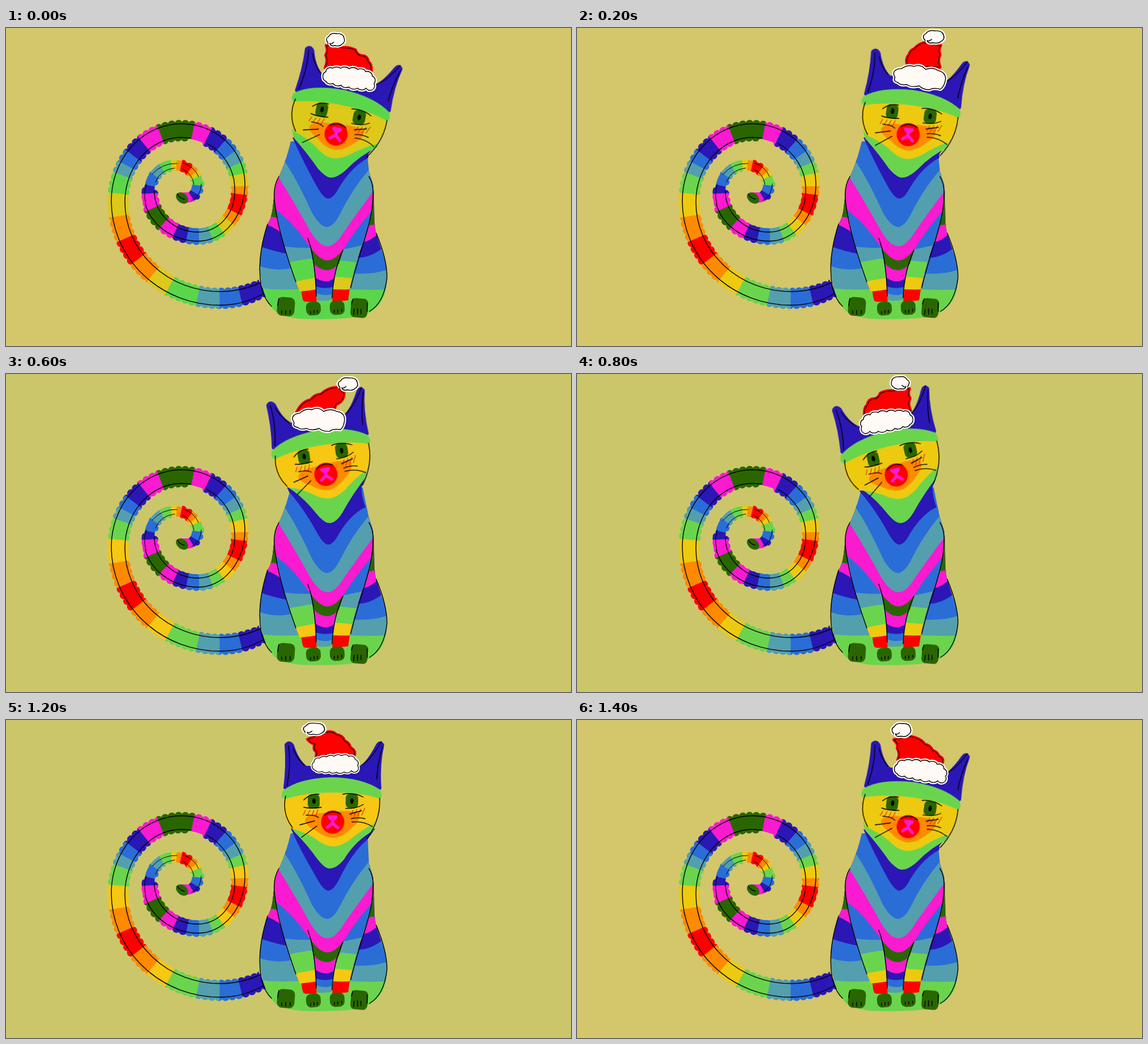
Recreate the animation shown at these times as an HTML page without scripts. Size 998 px wide and 561 px high, loop 1.6 s.

```html
<!DOCTYPE html>
<html lang="en">
<head>
<meta charset="utf-8">
<title>Rainbow cat</title>
<style>
html,body{margin:0;width:100%;height:100%;overflow:hidden}
svg{display:block;width:100vw;height:100vh;--y:#dcc919;--g:#5bd64a;background:#d4c66a;animation:tint 1.6s step-end infinite}
@keyframes tint{
0%{--y:#dcc919;--g:#5bd64a;background:#d4c66a}
12.5%{--y:#edca10;--g:#6bd44d;background:#d4c66a}
25%{--y:#f6c713;--g:#6bd44d;background:#ccc66a}
50%{--y:#edca10;--g:#6bd44d;background:#ccc66a}
62.5%{--y:#edca10;--g:#6bd44d;background:#d4c66a}
75%{--y:#f6c713;--g:#6bd44d;background:#ccc66a}
87.5%,100%{--y:#edca10;--g:#6bd44d;background:#d4c66a}
}
.n{--c:#2a17b5}.b{--c:#2a6dd6}.t{--c:#539fae}.m{--c:#fa1ad0}.d{--c:#2a6600}
.r{--c:#f00}.o{--c:#ff8a00}.y{--c:var(--y)}.g{--c:var(--g)}
.n,.b,.t,.m,.d,.r,.o,.y,.g{fill:var(--c)}
.tail use{fill:none;stroke:var(--c);stroke-width:52}
.tail .in{stroke-width:32}
.soft{stroke:var(--c);stroke-width:6;stroke-linejoin:round}
.k{fill:none;stroke:#000;stroke-width:1.4;stroke-linecap:round;stroke-linejoin:round}
.hat .k{stroke-width:1.1}
.w{fill:#fffaf5;stroke:#fffaf5;stroke-width:6;stroke-linejoin:round}
.head{transform-origin:577px 180px;animation:tilt 1.6s step-end infinite}
@keyframes tilt{
0%,100%{transform:translate(6px,7px) rotate(12deg)}
12.5%,87.5%{transform:translate(8px,8px) rotate(7.9deg)}
25%,75%{transform:none}
37.5%,62.5%{transform:translate(-12px,-3px) rotate(-9deg)}
50%{transform:translate(-13px,-2px) rotate(-13deg)}
}
.hat,.neck{visibility:hidden;animation:hat 1.6s step-end infinite}
.hat{animation-delay:calc(var(--i)*.2s - 1.6s)}
@keyframes hat{0%{visibility:visible}12.5%,100%{visibility:hidden}}
.right{animation-name:right}.mid{animation-name:mid}.left{animation-name:left}
@keyframes right{0%,87.5%,100%{visibility:visible}25%{visibility:hidden}}
@keyframes mid{0%,37.5%,87.5%,100%{visibility:hidden}25%,75%{visibility:visible}}
@keyframes left{0%,75%,100%{visibility:hidden}37.5%{visibility:visible}}
</style>
</head>
<body>
<svg viewBox="0 0 998 561" preserveAspectRatio="none">
<defs>
<path id="t" pathLength="1133" d="M453 458Q417 477 378 477A180 171 0 0 1 198 306A112 125 0 0 1 310 181A103 99 0 0 1 413 280A73 87 0 0 1 340 367A87 78 0 0 1 253 289A43 47 0 0 1 296 242A42 31 0 0 1 338 273A16 26 0 0 1 322 299H308"/>
<path id="out" d="M456 468Q420 489 378 489A192 184 0 0 1 186 305A124 136 0 0 1 310 169A112 106 0 0 1 422 275A82 101 0 0 1 340 376A97 86 0 0 1 246 310"/>
<path id="inn" d="M450 449Q415 465 378 465A168 158 0 0 1 210 307A100 114 0 0 1 310 193L326 194M354 203A94 92 0 0 1 404 285A64 72 0 0 1 340 360A78 72 0 0 1 262 288"/>
<path id="coil" d="M247 310Q242 292 248 275M258 258Q276 238 302 239M264 272Q272 250 298 247M313 238Q333 245 340 262M312 249Q330 258 332 276M345 275Q344 297 328 304"/>
<mask id="fur" maskUnits="userSpaceOnUse" x="170" y="150" width="300" height="360">
<g fill="none" stroke="#fff">
<use href="#t" stroke-width="27" stroke-dasharray="958 2000"/>
<use href="#t" stroke-width="18"/>
<g stroke-width="14" stroke-linecap="round" stroke-dasharray="0 12"><use href="#out"/><use href="#inn"/><use href="#coil" stroke-width="11"/></g>
</g>
</mask>
<path id="skin" d="M503 204Q494 238 482 262C468 300 476 325 462 346C452 385 446 405 449 430Q452 470 469 492Q478 509 520 513Q570 515 612 511Q655 505 668 472Q678 440 667 402Q661 385 653 360C648 335 652 300 648 275L640 250L633 228Z"/>
<path id="bib" d="M503 200Q494 238 482 262C470 285 474 312 480 335Q487 375 512 448L526 483H604L608 455Q618 410 635 365C649 325 649 300 648 275L640 250L630 200Z"/>
<clipPath id="body"><use href="#skin"/></clipPath>
<clipPath id="chest"><use href="#bib"/></clipPath>
<path id="brim" d="M565 77a8 7 0 0 1 12-6a9 6 0 0 1 14 0a9 6 0 0 1 15 1a9 6 0 0 1 15 1a9 6 0 0 1 14 4a9 8 0 0 1 12 8a8 8 0 0 1 3 13a8 8 0 0 1-14 8a9 7 0 0 1-15 0a9 6 0 0 1-15-2a9 6 0 0 1-14-3a9 6 0 0 1-14-3a9 6 0 0 1-13-4a8 9 0 0 1 0-17Z"/>
<path id="wavy" d="M532 78Q531 69 545 67Q555 58 566 61Q578 55 587 64Q600 58 610 64Q622 65 624 76Q624 90 617 96Q603 94 598 99Q586 100 579 94Q566 99 557 94Q546 97 541 92Q532 91 535 84Z"/>
<path id="pom" d="M-13 6Q-19-2-12-6Q-8-13 2-11Q13-12 15-4Q18 4 11 8Q7 12-1 10Q-9 12-10 6Q-7 8-3 4"/>
<g id="fluff"><use href="#brim" class="w"/><use href="#brim" class="k"/></g>
<g id="wave"><use href="#wavy" class="w"/><use href="#wavy" class="k"/></g>
<g id="ball"><use href="#pom" class="w"/><use href="#pom" class="k"/></g>
<path id="h0" d="M566 31Q570 40 565 48Q570 58 564 70L645 77Q646 64 640 60Q638 49 628 49Q620 48 617 39Q606 34 595 35Z"/>
<path id="h2" d="M540 64Q546 47 558 47Q564 39 576 41Q588 30 605 26L619 31Q618 44 614 50Q614 59 610 66Z"/>
<path id="h3" d="M514 67Q524 48 538 46Q546 36 556 36Q570 23 587 24L597 34Q596 49 583 53Q579 60 580 68Z"/>
<path id="h5" d="M515 28Q520 36 516 44Q521 54 516 66L573 64Q577 50 570 44Q568 36 561 34Q556 27 544 23Z"/>
<path id="h6" d="M533 34Q540 42 546 42Q542 52 549 56L548 68L614 66Q619 54 608 49Q606 40 598 37Q594 27 583 26Q577 19 565 22Z"/>
<path id="h7" d="M560 35Q569 43 566 50Q572 60 567 70L645 76Q648 67 639 64Q636 56 628 54Q623 44 614 43Q608 33 588 29Z"/>
</defs>

<g class="tail" mask="url(#fur)">
<use href="#t" class="in m" stroke-dasharray="1133 2000"/>
<use href="#t" class="in n" stroke-dasharray="1113 2000"/>
<use href="#t" class="in b" stroke-dasharray="1104 2000"/>
<use href="#t" class="in g" stroke-dasharray="1090 2000"/>
<use href="#t" class="in y" stroke-dasharray="1076 2000"/>
<use href="#t" class="in o" stroke-dasharray="1068 2000"/>
<use href="#t" class="in r" stroke-dasharray="1058 2000"/>
<use href="#t" class="in o" stroke-dasharray="1041 2000"/>
<use href="#t" class="in y" stroke-dasharray="1033 2000"/>
<use href="#t" class="in g" stroke-dasharray="1024 2000"/>
<use href="#t" class="in t" stroke-dasharray="1006 2000"/>
<use href="#t" class="in b" stroke-dasharray="988 2000"/>
<use href="#t" class="in n" stroke-dasharray="968 2000"/>
<use href="#t" class="m" stroke-dasharray="954 2000"/>
<use href="#t" class="d" stroke-dasharray="927 2000"/>
<use href="#t" class="m" stroke-dasharray="894 2000"/>
<use href="#t" class="n" stroke-dasharray="869 2000"/>
<use href="#t" class="b" stroke-dasharray="847 2000"/>
<use href="#t" class="t" stroke-dasharray="826 2000"/>
<use href="#t" class="g" stroke-dasharray="805 2000"/>
<use href="#t" class="y" stroke-dasharray="785 2000"/>
<use href="#t" class="o" stroke-dasharray="765 2000"/>
<use href="#t" class="r" stroke-dasharray="747 2000"/>
<use href="#t" class="o" stroke-dasharray="714 2000"/>
<use href="#t" class="y" stroke-dasharray="700 2000"/>
<use href="#t" class="g" stroke-dasharray="679 2000"/>
<use href="#t" class="t" stroke-dasharray="661 2000"/>
<use href="#t" class="b" stroke-dasharray="641 2000"/>
<use href="#t" class="n" stroke-dasharray="618 2000"/>
<use href="#t" class="m" stroke-dasharray="590 2000"/>
<use href="#t" class="d" stroke-dasharray="562 2000"/>
<use href="#t" class="m" stroke-dasharray="504 2000"/>
<use href="#t" class="n" stroke-dasharray="470 2000"/>
<use href="#t" class="b" stroke-dasharray="442 2000"/>
<use href="#t" class="t" stroke-dasharray="421 2000"/>
<use href="#t" class="g" stroke-dasharray="402 2000"/>
<use href="#t" class="y" stroke-dasharray="369 2000"/>
<use href="#t" class="o" stroke-dasharray="329 2000"/>
<use href="#t" class="r" stroke-dasharray="288 2000"/>
<use href="#t" class="o" stroke-dasharray="245 2000"/>
<use href="#t" class="y" stroke-dasharray="207 2000"/>
<use href="#t" class="g" stroke-dasharray="171 2000"/>
<use href="#t" class="t" stroke-dasharray="118 2000"/>
<use href="#t" class="b" stroke-dasharray="79 2000"/>
<use href="#t" class="n" stroke-dasharray="42 2000"/>
</g>
<ellipse class="d" cx="311" cy="300" rx="12" ry="8.5" transform="rotate(38 311 300)"/>
<g class="k"><use href="#out"/><use href="#inn"/><use href="#coil" stroke-width="1"/><path d="M303 293Q306 300 315 302"/></g>

<use href="#skin" class="g"/>
<g clip-path="url(#body)">
<path class="t" d="M440 457Q480 466 560 457Q620 464 680 461V230H440Z"/>
<path class="b" d="M440 417Q470 430 502 424L560 430L612 433Q650 436 680 424V230H440Z"/>
<path class="n" d="M440 382Q470 394 500 399L560 405H628Q650 402 670 384V230H440Z"/>
<path class="m" d="M450 344Q470 348 490 364L630 378Q645 376 660 360V230H450Z"/>
<path class="d" d="M460 331Q475 335 490 335L630 350 660 345V230H460Z"/>
</g>
<g clip-path="url(#chest)">
<path class="r" d="M500 300H640V470Q604 484 577 482H550Q535 486 524 481Z"/>
<path class="y" d="M480 466Q530 466 560 459Q590 464 640 459V250H480Z"/>
<path class="g" d="M480 452Q530 444 560 438Q590 438 640 445V250H480Z"/>
<path class="t" d="M480 420Q510 408 560 405Q590 412 650 415V250H480Z"/>
<path class="b" d="M470 382Q505 390 560 387L592 391Q620 386 660 376V230H470Z"/>
<path class="g" d="M535 375Q548 430 549 490H576Q578 430 597 388Z"/>
<path class="t" d="M535 375Q548 430 549 480Q562 483 576 479Q578 430 597 388Z"/>
<path class="b" d="M535 375Q547 430 548 468Q563 474 576 469Q578 430 597 388Z"/>
<path class="n" d="M535 375Q547 430 547 456Q562 461 577 457Q580 430 597 388Z"/>
<path class="m" d="M535 375Q545 410 546 440Q564 453 579 442Q583 415 597 388Z"/>
<path class="d" d="M535 375Q542 398 543 415Q566 439 588 416L597 388Z"/>
<path class="m" d="M470 316Q505 340 532 380Q554 411 568 410Q586 409 605 376Q627 344 655 312V230H470Z"/>
<path class="t" d="M476 255Q505 300 537 358Q554 386 568 385Q582 385 598 358Q623 322 655 280V230H480Z"/>
<path class="b" d="M485 225Q512 262 540 325Q555 351 567 351Q579 350 590 328Q614 279 650 240V200H490Z"/>
</g>

<g class="neck right">
<path class="b" d="M638 222L641 251H605Z"/>
<path class="n" d="M506 193Q522 230 545 272Q560 301 569 301Q578 301 588 282Q610 245 640 229L640 222 655 204Z"/>
<path class="g" d="M506 178Q506 193 511 197Q533 222 551 248Q565 264 574 264Q586 264 602 249Q625 225 656 210L650 180Z"/>
</g>
<g class="neck mid">
<path class="b" d="M639 208L641 251H600Z"/>
<path class="n" d="M503 191Q520 230 545 272Q560 301 569 301Q578 301 588 282Q610 235 639 210L652 192Z"/>
<path class="g" d="M499 183L510 198Q532 220 549 244Q563 262 571 262Q584 262 597 246Q617 213 649 195L650 170Z"/>
</g>
<g class="neck left">
<path class="n" d="M495 197L500 208Q524 235 545 272Q560 301 569 301Q578 301 588 282Q610 246 635 235Q628 218 628 200L637 176Z"/>
<path class="g" d="M492 192L498 200Q525 217 548 246Q562 263 571 263Q583 263 594 245Q612 212 637 180L634 160Z"/>
</g>

<path class="k" d="M482 262C468 285 475 312 478 330Q486 375 512 448M641 262Q650 275 648 300C647 345 625 390 609 458M533 371Q546 403 548 473M595 392Q578 430 576 476M462 346Q442 408 451 457Q457 480 469 491M654 362Q673 407 673 440Q668 485 642 500"/>
<g class="d">
<rect x="479" y="475" width="31" height="33" rx="9" transform="rotate(4 494 491)"/>
<rect x="530" y="483" width="26" height="24" rx="9" transform="rotate(-4 542 495)"/>
<rect x="572" y="481" width="26" height="25" rx="9" transform="rotate(-3 584 493)"/>
<rect x="609" y="477" width="30" height="34" rx="8" transform="rotate(5 624 494)"/>
</g>
<path class="k" d="M480 490L482 477M487 499V504M494 498V505M502 498V504M538 500V504M544 498V503M550 498V502M580 498V502M586 497V502M593 496V500M610 487L613 478M615 496L614 506M621 495V505M627 496V504M638 485V500"/>

<g class="head">
<path class="n soft" d="M495 44Q500 37 506 45Q514 72 530 84H626Q640 76 656 45Q661 37 665 44Q657 78 660 120L575 110 493 119Q498 80 495 44Z"/>
<path class="g" d="M489 125Q515 103 575 101Q630 102 661 123Q667 136 659 142L576 150 496 140Q483 140 489 125Z"/>
<path class="y" d="M491 140Q530 128 577 128Q630 128 661 139Q663 165 648 184Q628 194 605 213Q588 224 577 223Q562 222 546 209Q525 196 503 191Q486 166 491 140Z"/>
<path class="o" d="M528 177Q531 165 560 164Q596 158 622 162Q630 175 611 190Q593 208 577 208Q561 207 548 195Q531 188 528 177Z"/>
<circle class="r" cx="577" cy="180" r="20.5"/>
<path d="M571 171L583 171 577 177ZM577 175V182L568 189M577 182L586 190" fill="none" stroke="#fa1ad0" stroke-width="5.5" stroke-linecap="round" stroke-linejoin="round"/>
<rect class="d" x="533" y="131" width="21" height="25" rx="7"/>
<rect class="d" x="600" y="130" width="22" height="26" rx="8"/>
<ellipse cx="544" cy="143" rx="3" ry="5"/><ellipse cx="611" cy="143" rx="3" ry="5"/>
<path d="M529 159L525 168M537 159L532 169M544 159L540 169M551 158L547 170M613 159L609 169M620 158L614 171M627 157L621 170M634 155L628 168" stroke="#e62a10" stroke-width="1.2"/>
<path class="k" d="M526 141Q538 129 553 131M526 154Q540 157 557 154M595 131Q614 127 631 136M600 156Q618 157 631 149M562 168Q577 157 592 166M530 168Q546 167 552 172M519 185L545 178M522 207L549 187M607 166L628 160M610 174Q622 171 634 174M611 180Q631 178 647 188"/>
<path class="k" d="M494 134Q487 165 506 190M660 138Q662 175 638 209M499 45Q504 80 496 116M507 50Q513 67 527 80M663 38Q645 70 628 80M665 47Q656 78 655 104"/>
</g>

<g class="hat" style="--i:0"><use href="#h0" class="r soft"/><use href="#h0" class="k"/><use href="#fluff"/><use href="#ball" transform="translate(582 21)"/></g>
<g class="hat" style="--i:1"><g transform="matrix(-1 0 0 1 1157 3)"><use href="#h5" class="r soft"/><use href="#h5" class="k"/></g><use href="#wave" transform="translate(27 8) rotate(6 578 79)"/><use href="#ball" transform="translate(630 16) scale(1.15 1)"/></g>
<g class="hat" style="--i:2"><use href="#h2" class="r soft"/><use href="#h2" class="k"/><use href="#wave"/><use href="#ball" transform="translate(618 16) rotate(15)"/></g>
<g class="hat" style="--i:3"><use href="#h3" class="r soft"/><use href="#h3" class="k"/><use href="#wave" transform="translate(-26 2)"/><use href="#ball" transform="translate(604 18) scale(1.08 1)"/></g>
<g class="hat" style="--i:4"><g transform="matrix(-1 0 0 1 1153 -5)"><use href="#h0" class="r soft"/><use href="#h0" class="k"/><use href="#fluff"/><use href="#ball" transform="translate(582 21)"/></g></g>
<g class="hat" style="--i:5"><use href="#h5" class="r soft"/><use href="#h5" class="k"/><use href="#wave" transform="translate(-111 1) scale(1.15 1)"/><use href="#ball" transform="translate(524 12) scale(1.3 .9)"/></g>
<g class="hat" style="--i:6"><use href="#h6" class="r soft"/><use href="#h6" class="k"/><use href="#fluff" transform="translate(580 80) rotate(-9) scale(.88) translate(-604 -90)"/><use href="#ball" transform="translate(544 16) scale(1.18 .92)"/></g>
<g class="hat" style="--i:7"><use href="#h7" class="r soft"/><use href="#h7" class="k"/><use href="#fluff" transform="translate(1 1)"/><use href="#ball" transform="translate(573 18) scale(1.05)"/></g>
</svg>
</body>
</html>
```
